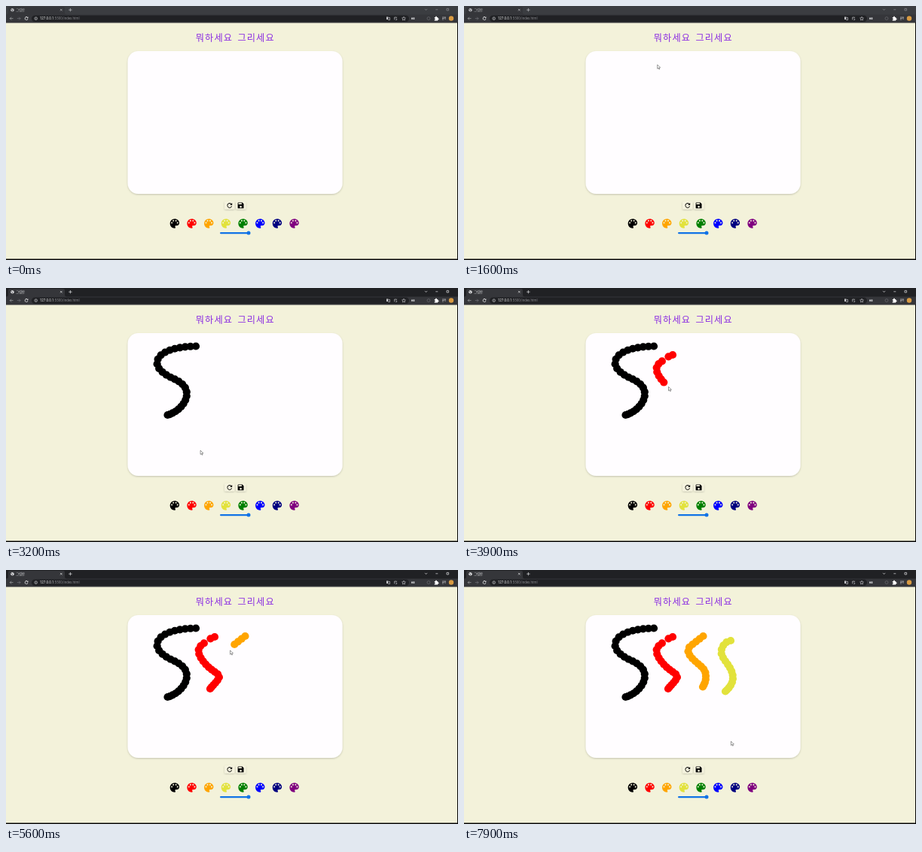
These frames come from a looping animation (600x338 px, 8 s). An HTML page:

```html
<!DOCTYPE html>
<html lang="ko">
<head>
<meta charset="utf-8">
<style>
html, body { margin: 0; width: 100%; height: 100%; overflow: hidden; background: #f3f2da; }
svg { display: block; width: 100vw; height: 100vh; }
text { font-family: "Noto Sans CJK KR", "Noto Sans CJK", sans-serif; }
.url { font-family: Roboto, sans-serif; font-size: 4.5px; }
.line { fill: none; stroke: currentColor; stroke-width: .7; }
.pointer { fill: #fff; stroke: #444; stroke-width: .55; }
</style>
</head>
<body>
<svg viewBox="0 0 600 338" preserveAspectRatio="none">
  <defs>
    <filter id="shadow" x="-10%" y="-10%" width="120%" height="130%">
      <feDropShadow dx="0" dy="1" stdDeviation="1" flood-color="#554" flood-opacity=".3"/>
    </filter>
    <g id="palette">
      <path d="M12 3c-4.97 0-9 4.03-9 9s4.03 9 9 9c.83 0 1.5-.67 1.5-1.5 0-.39-.15-.74-.39-1.01-.23-.26-.38-.61-.38-.99 0-.83.67-1.5 1.5-1.5H16c2.76 0 5-2.24 5-5 0-4.42-4.03-8-9-8z"/>
      <g fill="#f3f2da">
        <circle cx="6.5" cy="10.5" r="1.5"/><circle cx="9.5" cy="6.5" r="1.5"/>
        <circle cx="14.5" cy="6.5" r="1.5"/><circle cx="17.5" cy="10.5" r="1.5"/>
      </g>
    </g>
    <path id="reload" d="M17.65 6.35A8 8 0 1 0 19.73 14h-2.08A6 6 0 1 1 12 6c1.66 0 3.14.69 4.22 1.78L13 11h7V4z"/>
  </defs>

  <rect width="600" height="338" fill="#f3f2da"/>

  <!-- Browser window -->
  <rect id="strip" width="600" height="12"/>
  <path d="M0 11.5Q3 11.5 3 9V3Q3 1 5 1H76Q78 1 78 3V9Q78 11.5 81 11.5H600V22.5H0Z" fill="#35363a"/>
  <rect x="34" y="12.5" width="501" height="8.5" rx="4.2" fill="#202124"/>
  <g id="tab">
    <circle cx="8.5" cy="5.3" r="2.2" fill="currentColor"/>
    <path d="M6.7 4.3l2 1.2-.6 1.8M9 3.2l1 1.2" stroke="#35363a" stroke-width=".7" fill="none"/>
    <text x="13.3" y="6.9" font-size="4.2" fill="currentColor">그림판</text>
    <path class="line" d="M72 3.9l2.6 2.6m0-2.6L72 6.5M83.2 5.2h4.4M85.4 3v4.4"/>
  </g>
  <g id="controls">
    <path class="line" d="M556 3.9l1.6 1.6 1.6-1.6M570.3 4.8h3M585 3.4h2.6v2.6H585z"/>
  </g>
  <path class="line" color="#a5a6a9" d="M9.5 16.6H5.2m1.9-1.9l-1.9 1.9 1.9 1.9"/>
  <path class="line" color="#74757a" d="M14.8 16.6h4.3m-1.9-1.9l1.9 1.9-1.9 1.9"/>
  <use href="#reload" fill="#e8e8ea" transform="translate(23.8 13.2) scale(.28)"/>
  <g color="#c5c6c9">
    <circle class="line" cx="39.7" cy="16.6" r="1.8"/>
    <path class="line" d="M39.7 16.3v1.3m0-2.2v.4"/>
  </g>
  <text class="url" x="44.8" y="18.2" fill="#f0f0f1">127.0.0.1<tspan fill="#85868a">:5500/index.html</tspan></text>
  <g color="#c0c1c4">
    <path d="M505 14.4h2.4v3.6H505z" fill="currentColor"/>
    <path class="line" d="M507.8 15.4h1.7v3.2h-2.3M515.6 18.4v-3.4h2.6m-1.1 1.6l2-1.8m-2 3.6h1.6v-1.5"/>
    <path class="line" d="M528 14.2l.7 1.6 1.7.2-1.2 1.2.3 1.7-1.5-.8-1.5.8.3-1.7-1.2-1.2 1.7-.2z"/>
    <path d="M538 15.4h2v2.3h-2zM540.5 15.2h1.8v2.7h-1.8z" fill="currentColor"/>
    <circle class="line" cx="561" cy="16.5" r="2" opacity=".35"/>
    <path d="M568.8 15h1.3q-.2-1.5.9-1.5t.9 1.5h1.4v1.5q1.4-.2 1.4.8t-1.4.8v1.3h-4.5v-1.5q1.2 0 1.2-.7t-1.2-.7z" fill="#fff"/>
    <path class="line" d="M579 15h4m-4 1.5h2.6m-2.6 1.5h1.8m2.2 0v-3h1"/>
  </g>
  <circle cx="591" cy="16.5" r="3.2" fill="#d99b42"/>

  <!-- Page -->
  <text x="251.8" y="46.5" font-size="12.2" font-weight="500" fill="#8a2be2" letter-spacing="1.1" word-spacing="1.9">뭐하세요 그리세요</text>
  <rect x="161.6" y="60" width="285" height="190" rx="14" fill="#fffdff" filter="url(#shadow)"/>
  <g id="dots"></g>

  <g fill="#f5f3de" filter="url(#shadow)">
    <rect x="290" y="260" width="13.4" height="10.6" rx="1.5"/>
    <rect x="305" y="260" width="13.4" height="10.6" rx="1.5"/>
  </g>
  <use href="#reload" transform="translate(291.8 260.4) scale(.42)"/>
  <path transform="translate(306.3 260.1) scale(.44)" fill-rule="evenodd" d="M17 3H5a2 2 0 0 0-2 2v14a2 2 0 0 0 2 2h14a2 2 0 0 0 2-2V7zM12 19a3 3 0 1 1 0-6 3 3 0 0 1 0 6zM15 9H5V5h10z"/>
  <g id="palettes"></g>
  <rect x="284" y="300.9" width="39" height="2.4" rx="1.2" fill="#1273e6"/>
  <circle cx="322" cy="302.1" r="2.5" fill="#1273e6"/>

  <path id="arrow" class="pointer" d="M0 0v5.4l1.3-1.1.9 1.9.8-.4-.9-1.8 1.8-.1z"/>
  <path id="hand" class="pointer" d="M-.5 .4q.5-.9 1 0v2.2l2.4.5q.7.2.6 1L3 6.7H-.4L-2 4.4q0-.9 1.5-.1z"/>

  <path d="M0 336.5H600V338H0ZM599 22H600V338H599Z" fill="#060606"/>
</svg>
<script>
const LOOP = 8000, STEP = 100, ACTIVATED = 1700;
const ENTRY = { time: 1200, x: 390, y: 95 };
const YELLOW = "#e2e23c";
const COLORS = ["black", "red", "orange", YELLOW, "green", "blue", "navy", "purple"];

const byId = id => document.getElementById(id);
const clamp = u => Math.min(1, Math.max(0, u));
const ramp = (t, from, to) => clamp((t - from) / (to - from));
const smooth = u => u * u * (3 - 2 * u);
const travel = (a, b, u) => ({ x: a.x + (b.x - a.x) * smooth(u), y: a.y + (b.y - a.y) * smooth(u) });

function add(parent, tag, attrs) {
  const el = document.createElementNS("http://www.w3.org/2000/svg", tag);
  for (const key in attrs) el.setAttribute(key, attrs[key]);
  return parent.appendChild(el);
}

const paletteAt = color => ({ x: 223.9 + 22.68 * COLORS.indexOf(color), y: 289.5 });
for (const fill of COLORS) {
  const { x, y } = paletteAt(fill);
  add(byId("palettes"), "use", {
    href: "#palette", fill, transform: `translate(${x} ${y}) scale(.69) translate(-12 -12)`
  });
}

// The last stroke begins after the loop ends; the pointer only heads for its colour.
const strokes = [
  { color: "black", start: 1650, end: 2350, count: 28,
    d: "M252 77.5C222 78 200.5 86 200.5 100C201 108 209 114.5 223 121C234 126 240 132 240 141C240 152 229 165 214.5 169" },
  { color: "red", start: 3650, end: 4200, count: 19,
    d: "M277 89L271 91.5M267.5 94.5C260 99 255.5 102 255.5 108C256 116 265 126 271 131S283 138.5 283 142S276 152 271 158" },
  { color: "orange", start: 5500, end: 6000, count: 18,
    d: "M317.5 88L302 100Q297.5 103 297.5 108C298 115 309 123 315 128.5S321 138 321 143S319 152 317 155.5" },
  { color: YELLOW, start: 7250, end: 7700, count: 17,
    d: "M354 94C346 95 341.5 103 341.5 109C341.5 119 356.5 128 357 143C357 151 352 157 347 161.5" },
  { color: "navy", start: 9300, end: 9800, count: 0, d: "M380 95L370 105" }
];

for (const s of strokes) {
  const path = add(byId("dots"), "path", { d: s.d, fill: "none" });
  const length = path.getTotalLength();
  // The hand starts fast and slows down, so the dots crowd towards the end.
  s.at = u => path.getPointAtLength(length * (1 - Math.pow(1 - clamp(u), 1.2)));
  s.dots = Array.from({ length: s.count }, (_, i) => {
    const { x, y } = s.at(i / (s.count - 1));
    return add(byId("dots"), "circle", { cx: x, cy: y, r: 5.1, fill: s.color });
  });
}

function pointerAt(t) {
  const i = strokes.findIndex(s => t < s.end);
  const next = strokes[i], last = strokes[i - 1];
  if (t >= next.start) return next.at(ramp(t, next.start, next.end) + .08);
  if (!last) return travel(ENTRY, next.at(0), ramp(t, ENTRY.time, next.start));

  // Fetch the next colour, rest there briefly, then go to the new starting place.
  const u = ramp(t, last.end, next.start), palette = paletteAt(next.color);
  const spot = { x: palette.x + 1, y: palette.y - 3 };
  return u < .42 ? travel(last.at(1), spot, ramp(u, 0, .24)) : travel(spot, next.at(0), ramp(u, .42, 1));
}

function render(t) {
  const active = t >= ACTIVATED;
  byId("strip").setAttribute("fill", active ? "#202124" : "#3b3d41");
  byId("tab").setAttribute("color", active ? "#e4e5e7" : "#bfc0c3");
  byId("controls").setAttribute("color", active ? "#e0e0e2" : "#8b8c90");

  for (const s of strokes) {
    const drawn = Math.ceil(ramp(t, s.start, s.end) * s.count);
    s.dots.forEach((dot, i) => dot.setAttribute("visibility", i < drawn ? "visible" : "hidden"));
  }

  const { x, y } = pointerAt(t);
  const shape = t < ENTRY.time ? "" : y > 282 ? "hand" : "arrow";
  for (const id of ["arrow", "hand"]) {
    byId(id).setAttribute("visibility", id === shape ? "visible" : "hidden");
    byId(id).setAttribute("transform", `translate(${x} ${y})`);
  }
}

const origin = performance.now();
function tick() {
  const t = (performance.now() - origin) % LOOP;
  render(Math.floor(t / STEP) * STEP);
  requestAnimationFrame(tick);
}
tick();
</script>
</body>
</html>
```
